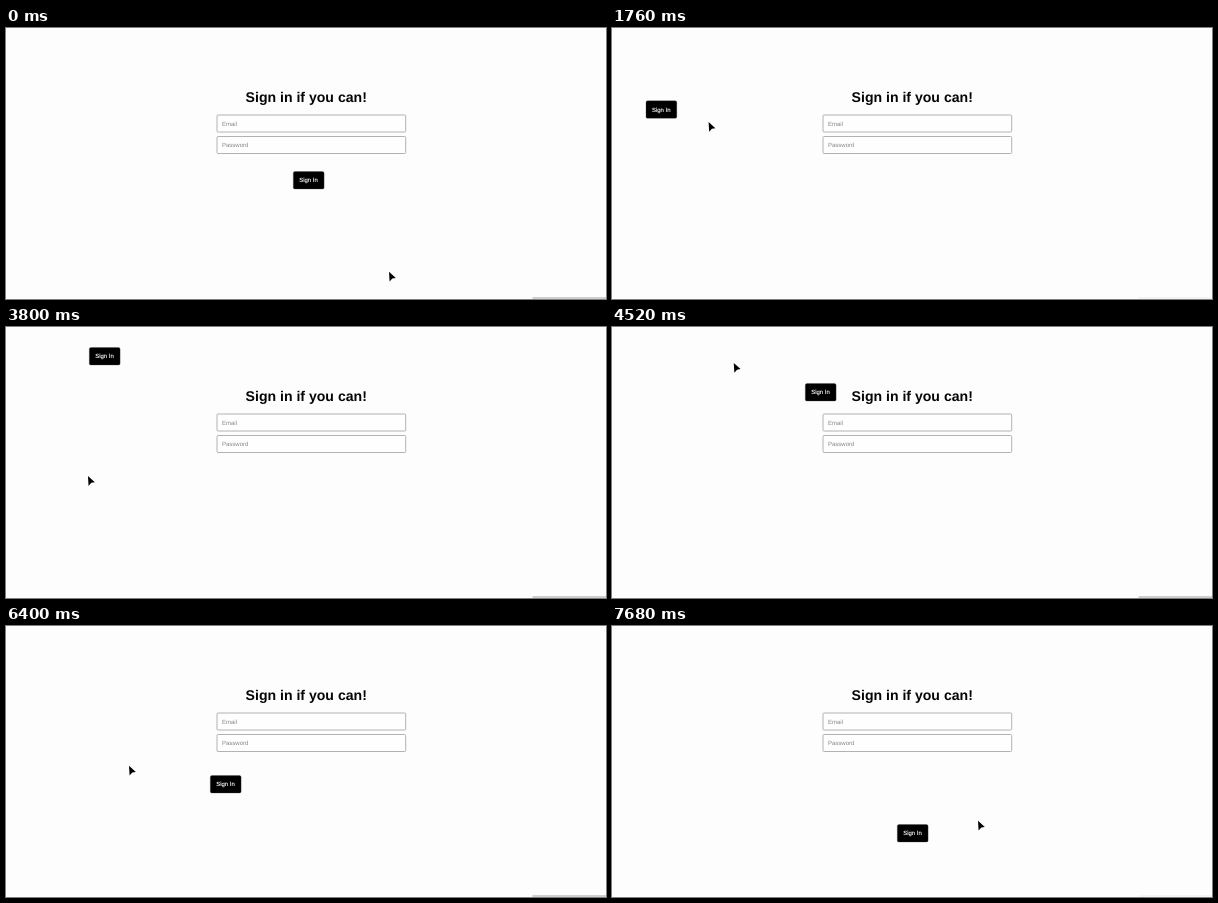
An HTML page for the animation above (7.72 s loop, 600x271 px).

```html
<!DOCTYPE html>
<html lang="en">
<head>
<meta charset="utf-8">
<title>Sign in if you can!</title>
<style>
  html, body { margin: 0; width: 100%; height: 100%; overflow: hidden; background: #fdfdfe; }
  svg { display: block; width: 600px; height: 271px; }
  text { font: 6px "Liberation Sans", Arial, sans-serif; text-rendering: geometricPrecision; }
  .title { font-size: 14.08px; font-weight: bold; fill: #050505; }
  .field { fill: #fefefe; stroke: #b2b2b2; stroke-width: 1; }
  .hint { fill: #858585; }
  .label { fill: #fff; stroke: #fff; stroke-width: .12; }
</style>
</head>
<body>
<svg viewBox="0 0 600 271">
  <text class="title" x="239.6" y="74">Sign in if you can!</text>
  <rect class="field" x="211" y="87" width="188.7" height="17" rx="1"/>
  <text class="hint" x="216" y="97.8">Email</text>
  <rect class="field" x="211" y="108.5" width="188.7" height="17" rx="1"/>
  <text class="hint" x="216" y="119.2">Password</text>
  <rect id="edge" x="526.5" y="269.4" width="74" height="1.2" fill="#b0b0b0"/>
  <g id="button">
    <rect x=".3" y=".5" width="30.8" height="17.5" rx="1.6" fill="#000" stroke="#444" stroke-width=".3"/>
    <text class="label" x="6.2" y="11.3">Sign In</text>
  </g>
  <path id="pointer" d="M0 .8 6.8 6.9 3.3 7.5 .6 10.6Z"/>
</svg>
<script>
const LOOP = 7720, STEP = 40, PAUSE = 200;
const START = { x: 383, y: 243 };
const FINISH = { time: 7680, x: 366, y: 194 };
const GRIP = { x: 20, y: 9 };   // where the pointer touches the button

// Each escape of the button: time, new place, rest of the pointer before it follows
const escapes = [
  [0, 287, 143], [840, 33.7, 72.3], [2120, 26, 184, PAUSE], [2800, 43, 247, PAUSE],
  [3320, 83, 20, PAUSE], [4280, 193, 56, PAUSE], [4800, 250, 166], [5320, 220, 165],
  [5440, 150, 66], [5800, 103, 130], [6200, 204, 149, PAUSE], [6600, 92, 61],
  [7160, 285, 198, PAUSE]
].map(([time, x, y, rest = 0]) => ({ time, x, y, rest }));

const [edge, button, pointer] = ["edge", "button", "pointer"].map(id => document.getElementById(id));
const clamp = v => Math.min(1, Math.max(0, v));
const easeOut = p => 1 - (1 - p) ** 1.4;
const mix = (a, b, p) => a + (b - a) * p;
const touch = spot => ({ x: spot.x + GRIP.x, y: spot.y + GRIP.y });
const place = (node, { x, y }) => node.setAttribute("transform", `translate(${x} ${y})`);

function pointerAt(t, i) {
  const spot = escapes[i], next = escapes[i + 1];
  const from = i ? touch(escapes[i - 1]) : START;
  const to = next ? touch(spot) : FINISH;
  const begin = spot.time + spot.rest;
  const p = easeOut(clamp((t - begin) / ((next || FINISH).time - begin)));
  return { x: mix(from.x, to.x, p), y: mix(from.y, to.y, p) };
}

// The bottom line drops to faint, then slowly darkens again
function edgeOpacity(t) {
  const sinceDrop = (t - 1240 + 6240) % 6240;
  return mix(.15, 1, clamp(sinceDrop / 1880) ** 2);
}

function draw(now) {
  const t = Math.floor((now % LOOP) / STEP) * STEP;
  const i = escapes.findLastIndex(spot => spot.time <= t);
  place(button, escapes[i]);
  place(pointer, pointerAt(t, i));
  edge.setAttribute("opacity", edgeOpacity(t));
}

let origin;
function tick(now) {
  origin ??= now;
  draw(now - origin);
  requestAnimationFrame(tick);
}
draw(0);
requestAnimationFrame(tick);
</script>
</body>
</html>
```
